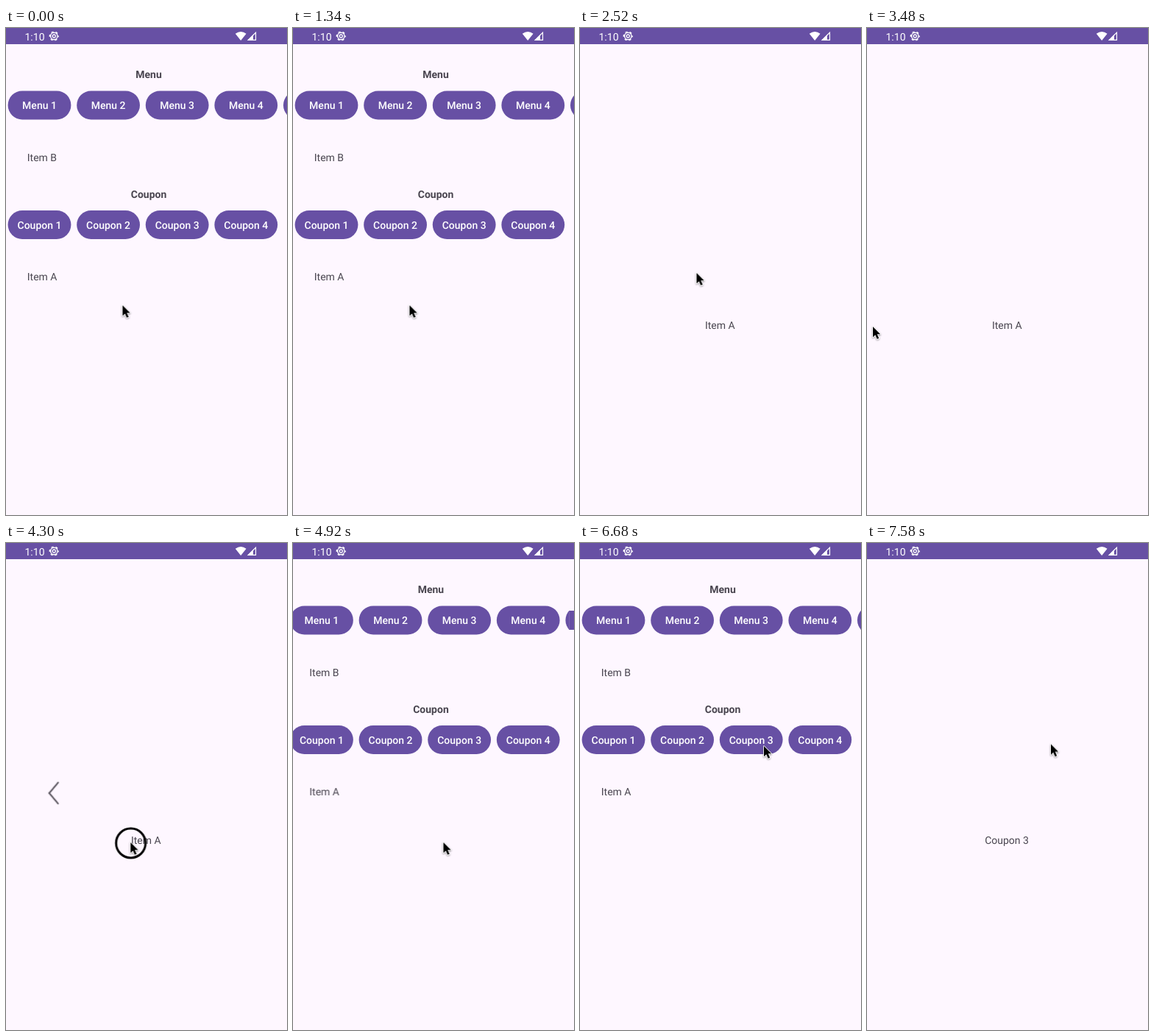
An HTML page for the animation above (8000 ms loop, 382 by 662 pixels).

```html
<!DOCTYPE html>
<html lang="en">
<head>
<meta charset="utf-8">
<title>Menu and coupon navigation</title>
<style>
  html, body { margin: 0; width: 100%; height: 100%; overflow: hidden; background: #fef7ff; }
  svg { display: block; width: 100%; height: 100%; }
  text { font: 400 14px Roboto, sans-serif; fill: #49454f; text-rendering: geometricPrecision; }
  .mid { text-anchor: middle; }
  .title { font-weight: 700; text-anchor: middle; }
  .label { font-weight: 500; fill: #fff; text-anchor: middle; }
  .purple { fill: #6750a4; }
  .page { fill: #fef7ff; }
  .clock { fill: #fff; }

  /* One 8 s loop: 1% is 80 ms */
  .anim { animation: 8s linear infinite both; }
  #main { animation-name: main; }
  #item { animation-name: item; }
  #coupon { animation-name: coupon; }
  #itemRipple { animation-name: item-ripple; }
  #buttonRipple { animation-name: button-ripple; }
  #cursor { animation-name: cursor; }
  #press { animation-name: press; animation-timing-function: step-end; }
  #chevron { animation-name: chevron; }
  #armUp { animation-name: arm-up; }
  #armDown { animation-name: arm-down; }

  @keyframes main {
    0%, 65.5125% { transform: none; }
    26.2625%, 89.5125% { transform: translateX(0); animation-timing-function: cubic-bezier(.3,0,.8,.15); }
    27.2%, 90.45% { transform: translateX(-15.28px); animation-timing-function: cubic-bezier(.05,.7,.1,1); }
    31.8875%, 95.1375%, 100% { transform: translateX(-38.2px); }
    59.8875% { transform: translateX(-38.2px); animation-timing-function: cubic-bezier(.3,0,.8,.15); }
    60.825% { transform: translateX(-22.92px); animation-timing-function: cubic-bezier(.05,.7,.1,1); }
  }
  @keyframes item {
    0% { transform: translateX(38.2px); opacity: 0; }
    26.2625% { transform: translateX(38.2px); animation-timing-function: cubic-bezier(.3,0,.8,.15); }
    26.8875% { opacity: 0; }
    27.2% { transform: translateX(22.92px); animation-timing-function: cubic-bezier(.05,.7,.1,1); }
    27.925% { opacity: 1; }
    31.8875% { transform: translateX(0); }
    59.8875% { transform: translateX(0); animation-timing-function: cubic-bezier(.3,0,.8,.15); }
    60.325% { opacity: 1; }
    60.825% { transform: translateX(15.28px); animation-timing-function: cubic-bezier(.05,.7,.1,1); }
    61.3625% { opacity: 0; }
    65.5125%, 100% { transform: translateX(38.2px); opacity: 0; }
  }
  @keyframes coupon {
    0% { transform: translateX(38.2px); opacity: 0; }
    89.5125% { transform: translateX(38.2px); animation-timing-function: cubic-bezier(.3,0,.8,.15); }
    90.1375% { opacity: 0; }
    90.45% { transform: translateX(22.92px); animation-timing-function: cubic-bezier(.05,.7,.1,1); }
    91.175% { opacity: 1; }
    95.1375%, 100% { transform: translateX(0); opacity: 1; }
  }
  @keyframes item-ripple {
    0%, 25.9% { transform: translate(160px, 336px) scale(.7); opacity: 0; }
    26.5% { transform: translate(162.5px, 337.5px) scale(1); opacity: 1; }
    28% { transform: translate(172px, 337.5px) scale(3); opacity: 1; }
    29%, 100% { transform: translate(178px, 337.5px) scale(4); opacity: 0; }
  }
  @keyframes button-ripple {
    0%, 89.2% { transform: translate(248px, 272px) scale(.4); opacity: 0; }
    89.8% { transform: translate(245px, 270px) scale(.7); opacity: 1; }
    91.2% { transform: translate(233px, 267.5px) scale(2); opacity: 1; }
    92%, 100% { transform: translate(233px, 267.5px) scale(2); opacity: 0; }
  }
  @keyframes cursor {
    0% { transform: translate(158.5px, 377px); }
    16.75% { transform: translate(158.5px, 377px); animation-timing-function: ease-in-out; }
    20% { transform: translate(158.5px, 333px); }
    35.25% { transform: translate(158.5px, 333px); animation-timing-function: ease-in-out; }
    43.5% { transform: translate(8px, 406px); }
    48.75% { transform: translate(8px, 406px); animation-timing-function: cubic-bezier(.4,0,.15,1); }
    55.75% { transform: translate(177.5px, 407px); }
    59% { transform: translate(177.5px, 407px); animation-timing-function: ease-in-out; }
    61.25% { transform: translate(204.5px, 407px); }
    74.25% { transform: translate(204.5px, 407px); animation-timing-function: ease-in-out; }
    80.5% { transform: translate(250px, 277px); }
    83.25% { transform: translate(250px, 277px); animation-timing-function: ease-out; }
    84.75%, 100% { transform: translate(250px, 273.5px); }
  }
  @keyframes press {
    0%, 25.75%, 59%, 89%, 100% { opacity: 0; }
    23.75%, 48.75%, 87.25% { opacity: 1; }
  }
  @keyframes chevron {
    0% { transform: translate(-6px, 340px); opacity: 0; }
    49.25% { transform: translate(-6px, 340px); opacity: 0; animation-timing-function: cubic-bezier(.35,0,.2,1); }
    50.25% { opacity: 1; }
    54.5%, 59% { transform: translate(59.5px, 340px); opacity: 1; }
    60.75%, 100% { transform: translate(56px, 340px); opacity: 0; }
  }
  @keyframes arm-up {
    0%, 50.5% { transform: rotate(0); animation-timing-function: ease-out; }
    52.75%, 100% { transform: rotate(40deg); }
  }
  @keyframes arm-down {
    0%, 50.5% { transform: rotate(0); animation-timing-function: ease-out; }
    52.75%, 100% { transform: rotate(-40deg); }
  }
</style>
</head>
<body>
<svg viewBox="0 0 382 662" preserveAspectRatio="none">
  <defs>
    <clipPath id="screenClip"><rect y="22" width="382" height="640"/></clipPath>
    <clipPath id="rowClip"><rect y="313" width="382" height="49"/></clipPath>
    <clipPath id="buttonClip"><rect x="189.8" y="248" width="85.8" height="39" rx="19.5"/></clipPath>
    <radialGradient id="grey">
      <stop offset=".35" stop-color="#1d1b20" stop-opacity=".15"/>
      <stop offset=".8" stop-color="#1d1b20" stop-opacity=".09"/>
      <stop offset="1" stop-color="#1d1b20" stop-opacity="0"/>
    </radialGradient>
    <radialGradient id="white">
      <stop offset=".5" stop-color="#fff" stop-opacity=".2"/>
      <stop offset="1" stop-color="#fff" stop-opacity="0"/>
    </radialGradient>
    <filter id="shadow" x="-50%" y="-50%" width="200%" height="200%">
      <feDropShadow dx="0" dy="1" stdDeviation=".9" flood-opacity=".45"/>
    </filter>
  </defs>

  <rect class="page" width="382" height="662"/>

  <g id="main" class="anim">
    <g clip-path="url(#screenClip)">
      <text class="title" x="194" y="68">Menu</text>
      <g id="menuRow"></g>
      <text x="28.8" y="180.5">Item B</text>
      <text class="title" x="194" y="231">Coupon</text>
      <g id="couponRow"></g>
      <g clip-path="url(#buttonClip)"><circle id="buttonRipple" class="anim" r="32" fill="url(#white)"/></g>
      <g clip-path="url(#rowClip)"><circle id="itemRipple" class="anim" r="32" fill="url(#grey)"/></g>
      <text x="28.8" y="343">Item A</text>
    </g>
    <!-- the last pixel column is stretched past the page edge -->
    <rect class="purple" x="381.8" y="92" width="45" height="26"/>
  </g>

  <g id="item" class="anim">
    <rect class="page" x="-60" y="22" width="520" height="640"/>
    <text class="mid" x="190.3" y="408.5">Item A</text>
  </g>
  <g id="coupon" class="anim">
    <rect class="page" x="-60" y="22" width="520" height="640"/>
    <text class="mid" x="190" y="408.5">Coupon 3</text>
  </g>

  <rect class="purple" width="382" height="22"/>
  <text class="clock" x="25.5" y="16.5">1:10</text>
  <g transform="translate(65.3 11)" fill="none" stroke="#fff">
    <circle r="4.7" stroke-width="1.4"/>
    <circle r="5.9" stroke-width="1.5" stroke-dasharray="3 3.178" stroke-dashoffset="1.5"/>
    <circle r="2" stroke-width="1.3"/>
  </g>
  <path fill="#fff" d="M319.2 17 311.8 7.8Q319.2 2.2 326.6 7.8Z"/>
  <path fill="#fff" d="M328 17 336 9V17Z"/>
  <path fill="none" stroke="#fff" stroke-width="1.2" d="M329.4 16.4H339.5V6.3Z"/>

  <g id="chevron" class="anim" stroke="#66616a" stroke-width="2.3" stroke-linecap="round">
    <path id="armUp" class="anim" d="M0 0V-18.6"/>
    <path id="armDown" class="anim" d="M0 0V18.6"/>
  </g>

  <g id="cursor" class="anim">
    <circle id="press" class="anim" cx=".3" cy="1" r="20" fill="none" stroke="#000" stroke-width="3"/>
    <path d="M0 0V14.2L3.3 11.2 5.7 16.8 8.2 15.7 5.8 10.3H10.2Z" stroke="#fff" stroke-width="1.6"
      stroke-linejoin="round" paint-order="stroke" filter="url(#shadow)"/>
  </g>
</svg>
<script>
  function fillRow(id, name, top, count) {
    let markup = '';
    for (let i = 0; i < count; i++) {
      const left = 2.6 + i * 93.6;
      markup += `<rect class="purple" x="${left}" y="${top}" width="85.8" height="39" rx="19.5"/>
        <text class="label" x="${left + 42.9}" y="${top + 24.8}">${name} ${i + 1}</text>`;
    }
    document.getElementById(id).innerHTML = markup;
  }
  fillRow('menuRow', 'Menu', 85.4, 5);
  fillRow('couponRow', 'Coupon', 248, 4);
</script>
</body>
</html>
```
